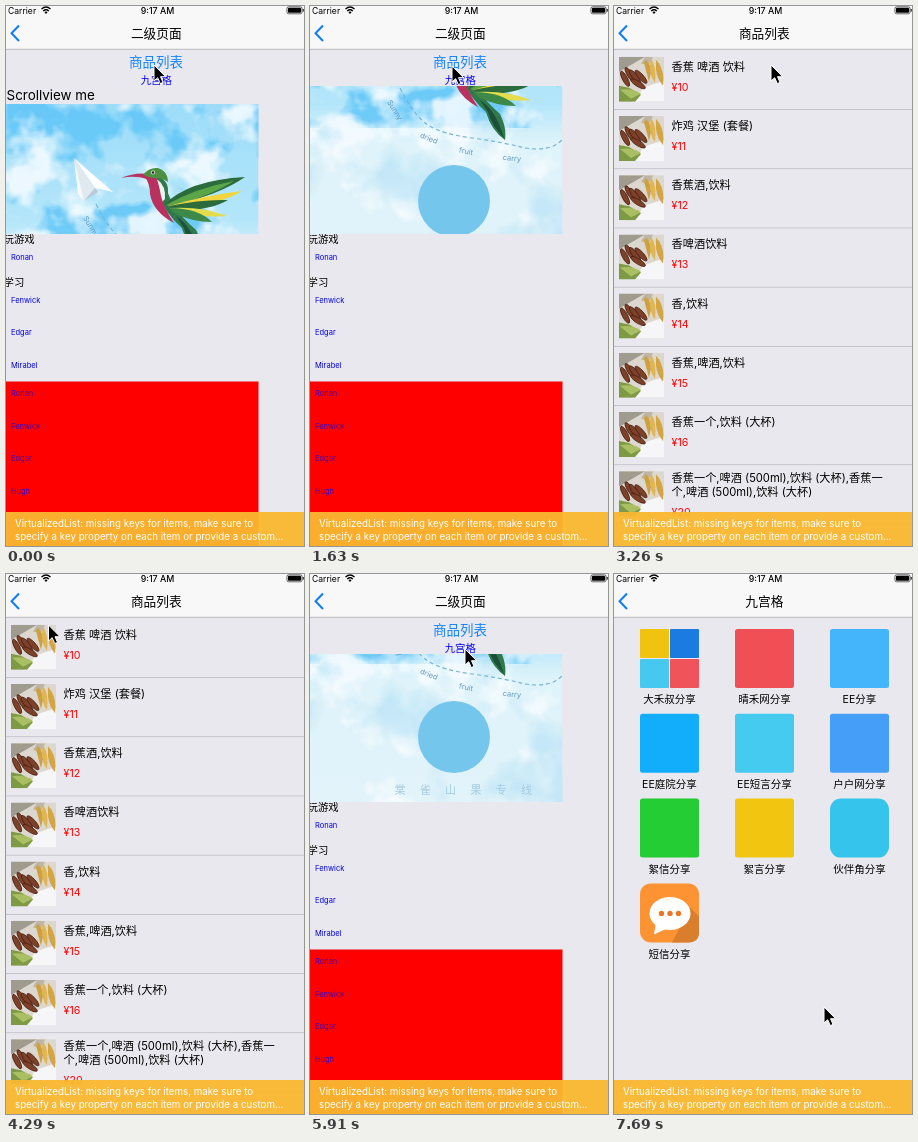
An HTML page for the animation above (7990 ms loop, 298 by 540 pixels).

```html
<!DOCTYPE html>
<html lang="zh">
<head>
<meta charset="utf-8">
<style>
html, body { margin: 0; width: 100%; height: 100%; overflow: hidden; background: #e9e8ee; }
svg { display: block; width: 298px; height: 540px; }
text { font-family: Inter, "Noto Sans CJK SC", "Noto Sans CJK", sans-serif; white-space: pre; }
</style>
</head>
<body>
<svg id="stage" viewBox="0 0 298 540" xmlns="http://www.w3.org/2000/svg"></svg>
<script>
const LOOP = 7990, STEP = 147.96, W = 298, PAGE = '#e9e8ee';

// ---------- markup helpers ----------
const rect = (x, y, w, h, fill, more = '') =>
  `<rect x="${x}" y="${y}" width="${w}" height="${h}" fill="${fill}" ${more}/>`;
const path = (d, fill, more = '') => `<path d="${d}" fill="${fill}" ${more}/>`;
const text = (x, cy, str, size, fill = '#000', more = '') =>
  `<text x="${x}" y="${(cy + size * 0.37).toFixed(2)}" font-size="${size}" fill="${fill}" ${more}>${str}</text>`;
const mid = (x, cy, str, size, fill, more = '') =>
  text(x, cy, str, size, fill, 'text-anchor="middle" ' + more);
const group = (id, body, more = '') => `<g id="${id}" ${more}>${body}</g>`;

// ---------- banner: 252 x 278 watercolour ----------
// noise turned into blotches of one colour (r, g, b from 0 to 1)
const blotch = (id, seed, freq, gain, bias, r, g, b) =>
  `<filter id="${id}" x="0" y="0" width="1" height="1" color-interpolation-filters="sRGB">
    <feTurbulence type="fractalNoise" baseFrequency="${freq}" numOctaves="4" seed="${seed}"/>
    <feColorMatrix values="0 0 0 0 ${r} 0 0 0 0 ${g} 0 0 0 0 ${b} ${gain} 0 0 0 ${bias}"/></filter>`;

const wash = rect(0, 0, 252.5, 278, 'url(#sky)') +
  rect(0, 0, 252.5, 140, '#fff', 'filter="url(#blue)" opacity=".8"') +
  rect(0, 0, 252.5, 278, '#fff', 'filter="url(#white)" opacity=".85"') +
  rect(0, 135, 252.5, 143, '#fff', 'filter="url(#pale)" opacity=".6"');

const plane =
  path('M68 54L107 88L89 84Z', '#fff') +
  path('M68 54L89 84L78 97Z', '#dfe9ef') +
  path('M68 54L78 97L72 90Z', '#f7fbfd') +
  path('M89 84L78 97L92 88Z', '#b9cbd6');

const bird =
  path('M115 74Q129 68 143 70L141 75Q129 71 115 74Z', '#b8315f') +
  path('M150 72Q163 75 162 89Q168 107 190 126Q197 140 195 152Q181 142 176 124Q158 108 152 90Z', '#2f7a4a') +
  path('M170 112Q186 122 194 150Q182 138 178 124Z', '#1c4f3c') +
  path('M152 76Q160 82 159 95L156 98Q150 86 147 76Z', '#e9f4ee') +
  path('M138 72Q144 79 144 90Q147 108 168 119Q157 102 155 92Q153 80 150 73Z', '#b8315f') +
  path('M137 71Q143 63 152 64Q162 67 162 78Q154 73 146 74Z', '#4b9140') +
  path('M158 101Q182 76 239 73Q215 90 166 102Z', '#2c6b3b') +
  path('M160 101Q190 84 228 77Q208 90 166 103Z', '#5aa548') +
  path('M163 102Q200 91 236 87Q216 100 168 105Z', '#f3d63e') +
  path('M163 102Q196 95 222 96Q204 107 168 106Z', '#2c6b3b') +
  path('M164 104Q196 102 221 112Q194 114 170 108Z', '#e5dc4c') +
  path('M164 104Q192 104 206 118Q186 118 168 109Z', '#3d8a48') +
  '<circle cx="147" cy="68.5" r="2" fill="#fff"/><circle cx="147" cy="68.5" r="1.3" fill="#222"/>';

const tilt = (x, cy, str, deg) =>
  mid(x, cy, str, 7.5, '#5f9cc4', `transform="rotate(${deg} ${x} ${cy})"`);

const banner = wash +
  path('M90 100Q104 128 118 137T162 150T215 160Q240 164 252 152', 'none',
    'stroke="#6fb2dc" stroke-width="1.1" stroke-dasharray="4 3"') +
  plane + bird +
  tilt(85, 122, 'Sunny', 58) + tilt(119, 150, 'dried', 22) +
  tilt(156, 163, 'fruit', 12) + tilt(202, 170, 'carry', 6) +
  '<circle cx="144" cy="213" r="36" fill="#74c6ec"/>' +
  [...'棠雀山果专线'].map((c, i) => mid(90 + i * 25.3, 266, c, 11, '#a3cbe0', 'font-weight="500"')).join('');

// ---------- pages ----------
function homePage() {
  const names = ['Fenwick', 'Edgar', 'Mirabel', 'Ronan', 'Fenwick', 'Edgar', 'Hugh'];
  const rows = names.map((n, i) =>
    text(5, 294 + i * 32.4 - (i > 2 ? 3.5 : 0), n, 7.5, i > 2 ? '#3a00b8' : '#0000f0')).join('');
  return rect(-2, 43, 302, 497, PAGE) +
    mid(150.1, 56.3, '商品列表', 13.5, '#1484fa', 'id="link"') +
    mid(150.3, 74.5, '九宫格', 10.4, '#0000f5') +
    `<g clip-path="url(#view)"><g id="scroll">${text(0.6, 89.3, 'Scrollview me', 13.4)}
      <g transform="translate(0 98)">${banner}</g></g></g>` +
    text(-2.5, 233, '玩游戏', 10.4) + text(5, 250.8, 'Ronan', 7.5, '#0000f0') +
    text(-2.5, 276.5, '学习', 10.4) +
    rect(0, 375.5, 252.5, 165, '#f00') + rows;
}

const photo = `<symbol id="photo" viewBox="0 0 45 45">` +
  rect(0, 0, 45, 45, '#ddd8cf') + path('M0 0H26L14 7 0 15Z', '#a09b8f') +
  path('M26 0H34L30 8 22 7Z', '#bdb5a6') + path('M45 24L24 31 16 45H45Z', '#f6f6f8') +
  path('M0 29L10 31 22 38 16 45H0Z', '#7f9a45') + path('M1 33Q13 31 22 37L12 42Z', '#a9bf62') +
  path('M27 3Q32 8 32 16L30 25Q27 14 25 6Z', '#cfa040') +
  path('M32 2Q38 10 36 26Q31 20 31 9Z', '#e0b654') +
  path('M37 3Q46 12 44 29Q38 22 37 13Z', '#d3a543') +
  [[6, 22, 62], [11, 18, 58], [16, 20, 52], [22, 20, 48], [19, 27, 32]].map(([x, y, a]) =>
    `<ellipse cx="${x}" cy="${y}" rx="8.5" ry="2.6" fill="#7d4029" stroke="#4a2115" stroke-width=".8" transform="rotate(${a} ${x} ${y})"/>`).join('') +
  `</symbol>`;

const panel = rect(-6, 43, 6, 497, 'url(#edge)') + rect(0, 43, 302, 497, PAGE);

function listPage() {
  const goods = ['香蕉 啤酒 饮料', '炸鸡 汉堡 (套餐)', '香蕉酒,饮料', '香啤酒饮料', '香,饮料',
    '香蕉,啤酒,饮料', '香蕉一个,饮料 (大杯)', '香蕉一个,啤酒 (500ml),饮料 (大杯),香蕉一'];
  return panel + goods.map((g, i) => {
    const y = 44 + i * 59.2, two = i === 7;
    return `<use href="#photo" x="5" y="${(y + 6.8).toFixed(1)}" width="45" height="45"/>` +
      text(57.6, y + (two ? 13.5 : 16.6), g, 11.2) +
      (two ? text(57.6, y + 27.2, '个,啤酒 (500ml),饮料 (大杯)', 11.2) : '') +
      text(57.6, y + (two ? 47.5 : 36.8), '¥' + (two ? 20 : 10 + i), 10.6, '#f00') +
      rect(0, y + 59.2, 302, 0.7, '#b9b8be');
  }).join('');
}

function gridPage() {
  const cells = [['大禾叔', ''], ['晴禾网', '#f04f55'], ['EE', '#45b5fb'], ['EE庭院', '#12aefc'],
    ['EE短言', '#45caf0'], ['户户网', '#459ef7'], ['絮信', '#24cd33'], ['絮言', '#f2c510'],
    ['伙伴角', '#35c5ec'], ['短信', '#fd9333']];
  const quad = ['#f0c30f', '#1b7be0', '#46c8f0', '#f0545a'];
  const bubble = path('M32 59L50 24 59 33V49Q59 59 48 59Z', '#d87e2d') +
    '<ellipse cx="30" cy="30" rx="20.5" ry="16.5" fill="#fff"/>' + path('M16 39L14 51 29 44Z', '#fff') +
    [21.5, 30, 38.5].map(x => `<circle cx="${x}" cy="30" r="2.7" fill="#e8772a"/>`).join('');
  return panel + cells.map(([name, color], i) => {
    const x = 26 + (i % 3) * 95, y = 55 + Math.floor(i / 3) * 84.8;
    const icon = color ? rect(0, 0, 59, 59, color, `rx="${i > 7 ? 11 : 2.5}"`)
      : quad.map((c, k) => rect((k % 2) * 30, (k >> 1) * 30, 29, 29, c, 'rx="1"')).join('');
    return `<g transform="translate(${x} ${y.toFixed(1)})">${icon}${i === 9 ? bubble : ''}</g>` +
      mid(x + 29.4, y + 70.6, name + '分享', 10.5);
  }).join('');
}

// ---------- fixed chrome ----------
const title = (id, str) => mid(150.3, 26.8, str, 12.7, '#000', `id="${id}" font-weight="500"`);
const bar = rect(0, 0, W, 43, '#f8f8f9') + rect(0, 42.8, W, 0.8, '#b0afb5') +
  text(2, 4.6, 'Carrier', 8.6) + mid(151.5, 4.6, '9:17 AM', 8.8, '#000', 'font-weight="500"') +
  path('M35.5 3Q40 -1 44.5 3M37.2 5Q40 2.6 42.8 5', 'none', 'stroke="#000" stroke-width="1.4"') +
  path('M38.3 6Q40 4.9 41.7 6L40 8Z', '#000') +
  rect(281, 0.8, 15, 7, 'none', 'rx="1.6" stroke="#000" stroke-width=".6"') +
  rect(282, 1.8, 13, 5, '#000', 'rx=".8"') + rect(296.7, 3, 1, 2.6, '#000') +
  path('M13 19.5L5.5 27.2 13 35', 'none', 'id="back" stroke="#0f7df8" stroke-width="2"') +
  title('tHome', '二级页面') + title('tList', '商品列表') + title('tGrid', '九宫格');

const warning = rect(0, 506, W, 34, 'rgb(250,184,48)', 'opacity=".95"') +
  text(9, 517.6, 'VirtualizedList: missing keys for items, make sure to', 9.75, '#fff') +
  text(9, 530.6, 'specify a key property on each item or provide a custom...', 9.75, '#fff');

const pointer = path('M0 0V16L3.7 12.7 6.3 18.6 9 17.4 6.5 11.7H11.6Z', '#000',
  'stroke="#fff" stroke-width="1" stroke-linejoin="round"');

const defs = `<defs>
  <linearGradient id="sky" x2="0" y2="1"><stop offset="0" stop-color="#9cdcf9"/>
    <stop offset=".42" stop-color="#b4e6fa"/><stop offset=".56" stop-color="#dff3fa"/><stop offset="1" stop-color="#e2f3fa"/></linearGradient>
  <linearGradient id="edge"><stop stop-opacity="0"/><stop offset="1" stop-opacity=".09"/></linearGradient>
  ${blotch('blue', 5, 0.02, 7, -3.5, 0.36, 0.77, 0.97)}
  ${blotch('white', 23, 0.018, 6, -3, 0.97, 0.99, 1)}
  ${blotch('pale', 9, 0.014, 5, -2.7, 0.7, 0.88, 0.96)}
  <clipPath id="view"><rect y="80" width="252.5" height="148"/></clipPath>${photo}</defs>`;

const stage = document.getElementById('stage');
stage.innerHTML = defs + group('home', homePage()) + rect(0, 43, W, 497, '#000', 'id="dim"') +
  group('list', listPage()) + group('grid', gridPage()) + bar + warning + group('cursor', pointer);

// ---------- motion ----------
const el = {};
stage.querySelectorAll('[id]').forEach(e => el[e.id] = e);

// rows: step, x, y
const cursorPath = [[0, 148, 59], [3, 146, 241], [4, 146, 241], [6, 140, 183], [7, 140, 183],
  [8, 140, 180], [9, 141, 150], [11, 142, 60], [12, 145, 20], [13, 148, 15], [15, 157, 69],
  [16, 157, 59], [22, 157, 59], [25, 74, 74], [27, 74, 74], [31, 11, 28], [35, 11, 28],
  [40, 155, 75], [46, 155, 75], [50, 160, 297], [52, 210, 433]];
const scrollPath = [[8, 0], [9, 14], [10, 60], [11, 116], [12, 142], [13, 148]];

function track(keys, n, col) {
  const i = keys.findIndex(k => k[0] >= n);
  if (i < 0) return keys[keys.length - 1][col];
  if (i === 0) return keys[0][col];
  const a = keys[i - 1], b = keys[i];
  return a[col] + (b[col] - a[col]) * (n - a[0]) / (b[0] - a[0]);
}

// critically damped slide, 0 to 1
function slide(ms) {
  const u = Math.max(0, ms) * 0.0183, p = 1 - (1 + u) * Math.exp(-u);
  return p > 0.985 ? 1 : p;
}

const move = (e, x, y = 0) => e.setAttribute('transform', `translate(${x.toFixed(2)} ${y.toFixed(2)})`);
const fade = (e, a) => e.setAttribute('opacity', a.toFixed(3));

function draw(time) {
  const n = Math.min(53, Math.floor((time % LOOP + 14) / STEP)), t = n * STEP;
  const popping = n >= 33 && n < 43;
  const pop = slide(t - 4893);
  const onList = slide(t - 2899) * (1 - pop), onGrid = slide(t - 6478);
  const cover = Math.max(onList, onGrid);

  move(el.home, -0.32 * W * cover);
  fade(el.dim, 0.15 * cover);
  move(el.list, onList > 0 ? W * (1 - onList) : W + 20);
  move(el.grid, onGrid > 0 ? W * (1 - onGrid) : W + 20);
  move(el.scroll, 0, -track(scrollPath, n, 1));
  fade(el.link, n >= 18 && n < 23 ? 0.28 : 1);

  fade(el.tHome, popping ? pop : 1 - cover);
  fade(el.tList, popping ? Math.max(0, 1 - pop * 1.35) : onList ** 2);
  fade(el.tGrid, onGrid ** 3);
  fade(el.back, popping ? 1 : Math.max(cover ** 3, 1 - cover));
  move(el.cursor, track(cursorPath, n, 1), track(cursorPath, n, 2));
}

function tick() {
  draw(performance.now());
  requestAnimationFrame(tick);
}
tick();
</script>
</body>
</html>
```
